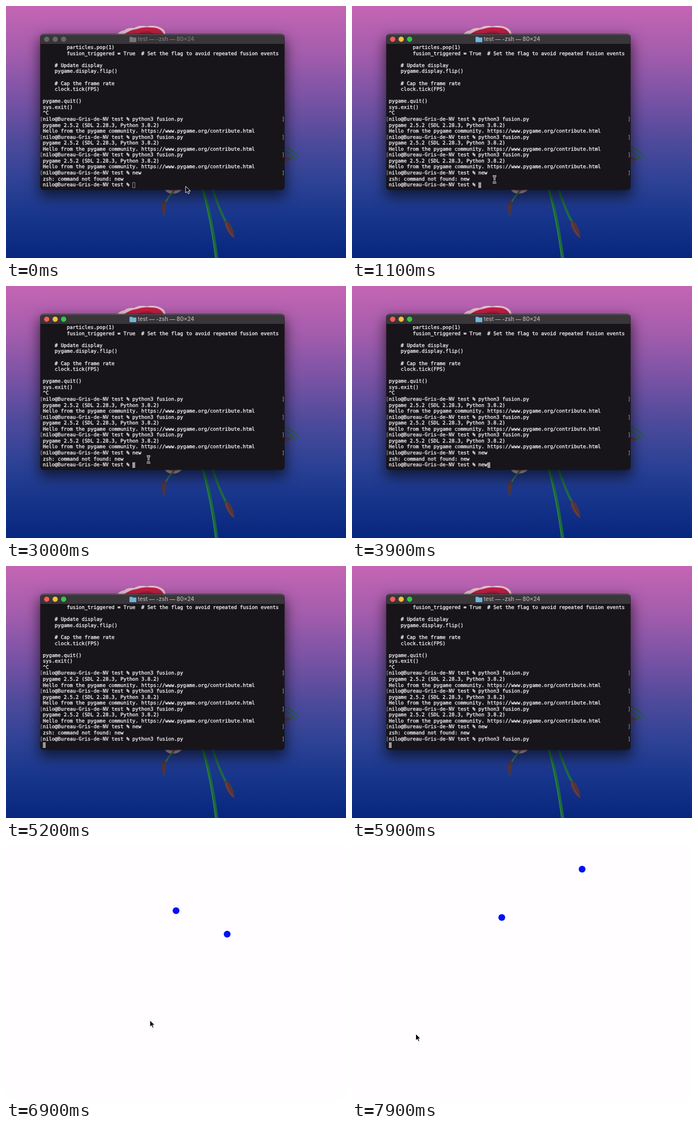
These frames come from a looping animation (600x446 px, 8000 ms). An HTML page:

```html
<!DOCTYPE html>
<html lang="en">
<head>
<meta charset="utf-8">
<style>
html, body { margin: 0; width: 600px; height: 446px; overflow: hidden; background: #000 }
svg, #desk, #game, #win, pre { position: absolute; left: 0; top: 0; margin: 0 }
#desk, #game { width: 600px; height: 446px; overflow: hidden }
#desk { background: linear-gradient(#c465b3 0%, #a55dad 18%, #7b53a5 36%, #4e4a9b 54%, #2d4295 70%, #17358b 84%, #07267d 100%) }
#win { left: 61px; top: 50px; width: 430px; height: 275px; border-radius: 5px; background: #18151a;
  box-shadow: 0 0 0 .6px #111, 0 10px 23px 3px rgba(0,0,0,.6) }
#bar { height: 17px; border-radius: 5px 5px 0 0; background: #39363a; box-shadow: inset 0 .7px #6b686c }
pre { left: 59.75px; top: 69.2px; color: #f2f1f3; font: 8.757px/10.57px "DejaVu Sans Mono", monospace;
  text-rendering: geometricPrecision; -webkit-text-stroke: .32px }
pre i { font-style: normal; color: #89868b }
pre b { background: #9b989d }
pre b.hollow { background: none; box-shadow: inset 0 0 0 .8px #9b989d }
text { font: 500 9.75px Inter, "Open Sans", sans-serif }
</style>
</head>
<body>
<div id="desk">
  <svg width="600" height="446" fill="none" stroke-linecap="round">
    <path d="M196 51Q200 44 209 43Q215 38 226 39Q236 33 247 36Q262 33 272 38Q282 42 281 51Z" fill="#e6c3cf"/>
    <path d="M207 51Q219 42 230 41Q243 36 256 38Q274 38 279 51Z" fill="#c32046"/>
    <path d="M231 51Q242 43 255 45L264 51Z" fill="#a81a3c"/>
    <path d="M280 324Q284 333 295 332Q307 331 311 324Z" fill="#cdb3bf"/>
    <path d="M288 325Q295 331 303 325Z" fill="#a8647a"/>
    <path d="M296 328Q286 338 280 350" stroke="#3f7a4a" stroke-width="2.5"/>
    <path d="M277 343Q271 356 279 373Q283 360 283 347Z" fill="#4c3640"/>
    <path d="M347 322Q362 370 372 447" stroke="#1a6440" stroke-width="5.5"/>
    <path d="M346 322Q360 370 370 447" stroke="#2b8047" stroke-width="1.8"/>
    <path d="M364 322Q375 358 390 386" stroke="#1f6a41" stroke-width="4.2"/>
    <path d="M386 380Q384 396 403 412Q403 395 393 382Z" fill="#553539"/>
    <path d="M388 383Q390 396 400 407" stroke="#7c4a45" stroke-width="1.2"/>
    <path d="M489 249Q506 252 517 269M489 256Q503 258 509 272M490 271L508 270" stroke="#28603f" stroke-width="1.8"/>
    <path d="M490 268Q499 267 503 272Q498 275 490 274Z" fill="#5b3c45"/>
  </svg>
  <div id="win"><div id="bar"></div></div>
  <svg width="600" height="80">
    <circle class="light" cx="71.8" cy="58.8" r="4.6"/>
    <circle class="light" cx="86.8" cy="58.8" r="4.6"/>
    <circle class="light" cx="101.7" cy="58.8" r="4.6"/>
    <path id="folder" d="M218 55.5q0-1 1-1h3.5l1.2 1.3h5.3q1 0 1 1v6.2q0 1-1 1h-10q-1 0-1-1Z"/>
    <text id="title" x="232.5" y="62.4">test — -zsh — 80×24</text>
  </svg>
  <pre id="term"></pre>
</div>
<div id="game">
  <svg width="600" height="446" fill="#0010f5">
    <circle class="ball" r="6"/>
    <circle class="ball" r="6"/>
  </svg>
</div>
<svg width="600" height="446">
  <path id="arrow" d="M0 0V11.7L2.7 9.2L4.6 13.3L6.6 12.4L4.8 8.4H8.5Z" fill="#000" stroke="#fff" stroke-width=".9"/>
  <defs><path id="stroke" d="M-3-6Q0-6 0-4Q0-6 3-6M0-4V4M-3 6Q0 6 0 4Q0 6 3 6M-1.5 2H1.5"/></defs>
  <g id="beam" fill="none">
    <use href="#stroke" stroke="#fff" stroke-width="2.8"/>
    <use href="#stroke" stroke="#111" stroke-width="1.1"/>
  </g>
</svg>
<script>
const LOOP = 8000, ACTIVE = 1000, RECALL = 3500, RECALL_AGAIN = 4300, ENTER = 4900,
      BLACK = 6000, WHITE = 6200;
const $ = id => document.getElementById(id);
const lights = document.querySelectorAll('.light');
const balls = document.querySelectorAll('.ball');
const prompt = 'nilo@Bureau-Gris-de-NV test % ';
const run = 'python3 fusion.py';

const entered = cmd => `<i>[</i>${(prompt + cmd).padEnd(80)}<i>]</i>`;
const greeting = [
  entered(run),
  ' pygame 2.5.2 (SDL 2.28.3, Python 3.8.2)',
  ' Hello from the pygame community. https://www.pygame.org/contribute.html'
];
const history = [
  '         particles.pop(1)',
  '         fusion_triggered = True  # Set the flag to avoid repeated fusion events',
  '',
  '     # Update display',
  '     pygame.display.flip()',
  '',
  '     # Cap the frame rate',
  '     clock.tick(FPS)',
  '',
  ' pygame.quit()',
  ' sys.exit()',
  ' ^C',
  ...greeting, ...greeting, ...greeting,
  entered('new'),
  ' zsh: command not found: new'
];

const mix = (a, b, k) => a + (b - a) * k;
const ease = (t, from, to) => {
  const k = Math.min(1, Math.max(0, (t - from) / (to - from)));
  return k * k * (3 - 2 * k);
};
const place = (el, x, y) => el.setAttribute('transform', `translate(${x} ${y})`);
const show = (el, on) => el.style.display = on ? '' : 'none';

let shown = '';
function drawTerminal(t) {
  const active = t >= ACTIVE;
  const caret = `<b${active ? '' : ' class="hollow"'}> </b>`;
  const cmd = t < RECALL ? '' : t < RECALL_AGAIN ? 'new' : run;
  const lines = t < ENTER
    ? [...history, ' ' + prompt + cmd + caret]
    : [...history.slice(1), entered(run), ' ' + caret];
  const html = lines.join('\n');
  if (html !== shown) $('term').innerHTML = shown = html;
  lights.forEach((l, i) => l.setAttribute('fill', active ? ['#fc5b57', '#fdbc40', '#34c748'][i] : '#69666a'));
  $('folder').setAttribute('fill', active ? '#70b5d8' : '#77747a');
  $('title').setAttribute('fill', active ? '#b9b6bb' : '#7c797e');
}

// Both balls follow straight lines, steadily gaining speed.
function drawBalls(t) {
  const s = (t - 6300) / 1000;
  const way = .383 * s + .28 * s * s;
  place(balls[0], 265 + 106 * way, 138.8 - 73.5 * way);
  place(balls[1], 432 - 126 * way, 165.8 - 29.5 * way);
}

function drawPointer(t) {
  const go = ease(t, 300, ACTIVE), leave = ease(t, 7200, 7900);
  const game = t >= BLACK;
  show($('arrow'), game || t < ACTIVE);
  show($('beam'), t >= ACTIVE && t < RECALL);
  place($('beam'), 251.5, 307);
  if (game) place($('arrow'), mix(254, 112.5, leave), mix(308.5, 332.5, leave));
  else place($('arrow'), mix(317, 251, go), mix(319, 307, go));
}

function frame() {
  const t = performance.now() % LOOP;
  show($('desk'), t < BLACK);
  show($('game'), t >= BLACK);
  $('game').style.background = t < WHITE ? '#000' : '#fffdff';
  balls.forEach(b => show(b, t >= WHITE));
  drawTerminal(t);
  drawBalls(t);
  drawPointer(t);
  requestAnimationFrame(frame);
}
frame();
</script>
</body>
</html>
```
